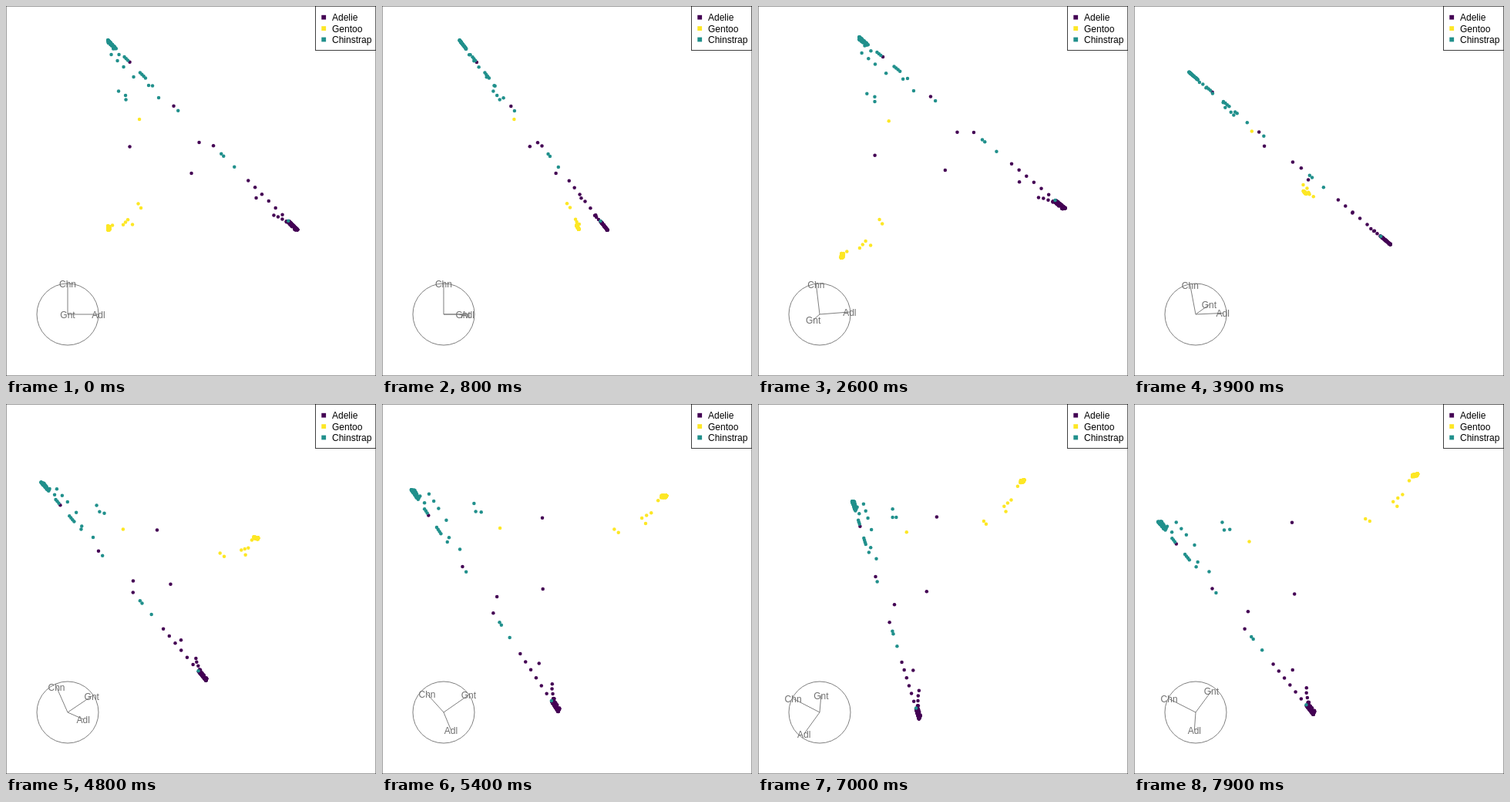
Write an HTML page with a canvas that moves like this. It is 480 by 480 pixels and loops after 8000 ms.

```html
<!DOCTYPE html>
<html lang="en">
<head>
<meta charset="utf-8">
<title>Species tour</title>
<style>
  html, body { margin: 0; width: 100%; height: 100%; overflow: hidden; background: #fff; }
  canvas { display: block; width: 480px; height: 480px; }
</style>
</head>
<body>
<canvas id="stage" width="480" height="480"></canvas>
<script>
const ctx = document.getElementById('stage').getContext('2d');
const TICK = 100, TICKS = 80, SCALE = 246, TEXT_DROP = 4.8;
const MEAN = [0.438, 0.204, 0.358];            // Adelie, Chinstrap, Gentoo
const COLORS = { Adelie: '#440154', Gentoo: '#fde725', Chinstrap: '#21908c' };

// Tour legs: heading of the tilt in degrees, angle to the next plane in radians
const LEGS = [
  [180.3, 1.024], [10.1, 1.325], [226.2, 0.48], [207.6, 0.982],
  [232.5, 1.15], [172.8, 1.138], [12.9, 1.57]
];

let seed = 7;
const rand = () => (seed = (seed * 16807) % 2147483647) / 2147483647;
const times = (n, make) => Array.from({ length: n }, (_, i) => make(i));
const spread = (from, to, n) => times(n, i => from + (to - from) * i / (n - 1));
const row = (list, gentoo) => list.map(adelie => [adelie, gentoo]);
const cluster = (n, place) => times(n, () => place(rand() ** 2, rand() ** 4));

// Each dot is its [Adelie, Gentoo] share in units of 1 / SCALE; Chinstrap has the rest
const adelie = [
  ...row([28.3, 85.3, 136.8, ...spread(182, 226.3, 6)], 0.3),
  ...times(4, i => [215.2 + 5.5 * i, 12 * 0.72 ** i]),
  [118.3, 14.5], [28.3, 110], [108.3, 64.5], [192.3, 12.5],
  ...cluster(115, (r, s) => [SCALE - 11 * r - 4 * s, 4 * s])
];
const gentoo = [
  [40.8, 62], [39.3, 173], [42.8, 175], [31.8, 207.5], [5.8, 234.5],
  ...spread(19.8, 25.8, 3).map(a => [a, 261 - 2.08 * a]),
  ...cluster(105, (r, s) => [2.5 * s, SCALE - 5 * r * r - 2.5 * s])
];
const chinstrap = [
  ...row([...spread(21.3, 25.8, 3), ...spread(41.7, 48.7, 4), 91, 147, 150, 164, 234], 0.5),
  ...row([...spread(4.3, 20.3, 3), 33.3], 14.6),
  [14.3, 4.5], [52.8, 6], [57.8, 1.5], [65.8, 9],
  [13.8, 52.5], [22.8, 49], [23.3, 54],
  ...cluster(44, (r, s) => [12 * r, 5 * s])
];

const centre = ([a, g]) => [a, SCALE - a - g, g].map((n, i) => n / SCALE - MEAN[i]);
const groups = [['Adelie', adelie], ['Gentoo', gentoo], ['Chinstrap', chinstrap]]
  .map(([name, dots]) => [name, dots.map(centre)]);

const mix = (p, u, q, v) => u.map((n, i) => p * n + q * v[i]);
const dot = (u, v) => u[0] * v[0] + u[1] * v[1] + u[2] * v[2];

// Tilt the viewing plane about one line lying in it
function turn([X, Y, N], heading, angle) {
  const c = Math.cos(heading), s = Math.sin(heading);
  const u = mix(c, X, s, Y), w = mix(-s, X, c, Y);
  const u2 = mix(Math.cos(angle), u, -Math.sin(angle), N);
  const n2 = mix(Math.cos(angle), N, Math.sin(angle), u);
  return [mix(c, u2, -s, w), mix(s, u2, c, w), n2];
}

// Each step covers 0.1 of the distance between planes; a leg ends with one still tick
function viewAt(tick) {
  let view = [[1, 0, 0], [0, 1, 0], [0, 0, 1]], start = 0;
  for (const [deg, angle] of LEGS) {
    if (tick <= start) break;
    const length = 10 * Math.SQRT2 * Math.sin(angle);
    const steps = Math.floor(length);
    view = turn(view, deg * Math.PI / 180, angle / length * Math.min(tick - start, steps));
    start += steps + 1;
  }
  return view;
}

function drawAxes(X, Y) {
  ctx.strokeStyle = '#7f7f7f';
  ctx.lineWidth = 1;
  ctx.beginPath();
  ctx.arc(80, 400, 40, 0, 2 * Math.PI);
  ctx.stroke();
  ctx.fillStyle = '#707070';
  ctx.textAlign = 'center';
  ['Adl', 'Chn', 'Gnt'].forEach((label, i) => {
    const x = 80 + 40 * X[i], y = 400 - 40 * Y[i];
    ctx.beginPath();
    ctx.moveTo(80, 400);
    ctx.lineTo(x, y);
    ctx.stroke();
    ctx.fillText(label, x, y + TEXT_DROP);
  });
}

function drawDots(X, Y) {
  for (const [name, points] of groups) {
    ctx.fillStyle = COLORS[name];
    for (const p of points) {
      ctx.beginPath();
      ctx.arc(240 + SCALE * dot(p, X), 240 - SCALE * dot(p, Y), 2.25, 0, 2 * Math.PI);
      ctx.fill();
    }
  }
}

function drawLegend() {
  ctx.strokeStyle = '#000';
  ctx.lineWidth = 0.75;
  ctx.strokeRect(0, 0, 480, 480);
  ctx.fillStyle = '#fff';
  ctx.fillRect(402, 1, 77, 56);
  ctx.strokeRect(401.5, 0, 78.5, 57.5);
  ctx.textAlign = 'left';
  Object.keys(COLORS).forEach((name, i) => {
    const y = 14.6 + 14.4 * i;
    ctx.fillStyle = COLORS[name];
    ctx.fillRect(409.3, y - 2.8, 5.8, 5.8);
    ctx.fillStyle = '#000';
    ctx.fillText(name, 423, y + TEXT_DROP);
  });
}

function draw(tick) {
  const [X, Y] = viewAt(tick);
  ctx.fillStyle = '#fff';
  ctx.fillRect(0, 0, 480, 480);
  ctx.font = '12px "Liberation Sans", Arial, sans-serif';
  drawAxes(X, Y);
  drawDots(X, Y);
  drawLegend();
}

const began = performance.now();
let shown = -1;
function loop() {
  const tick = Math.floor((performance.now() - began) / TICK) % TICKS;
  if (tick !== shown) draw(shown = tick);
  requestAnimationFrame(loop);
}
loop();
</script>
</body>
</html>
```
